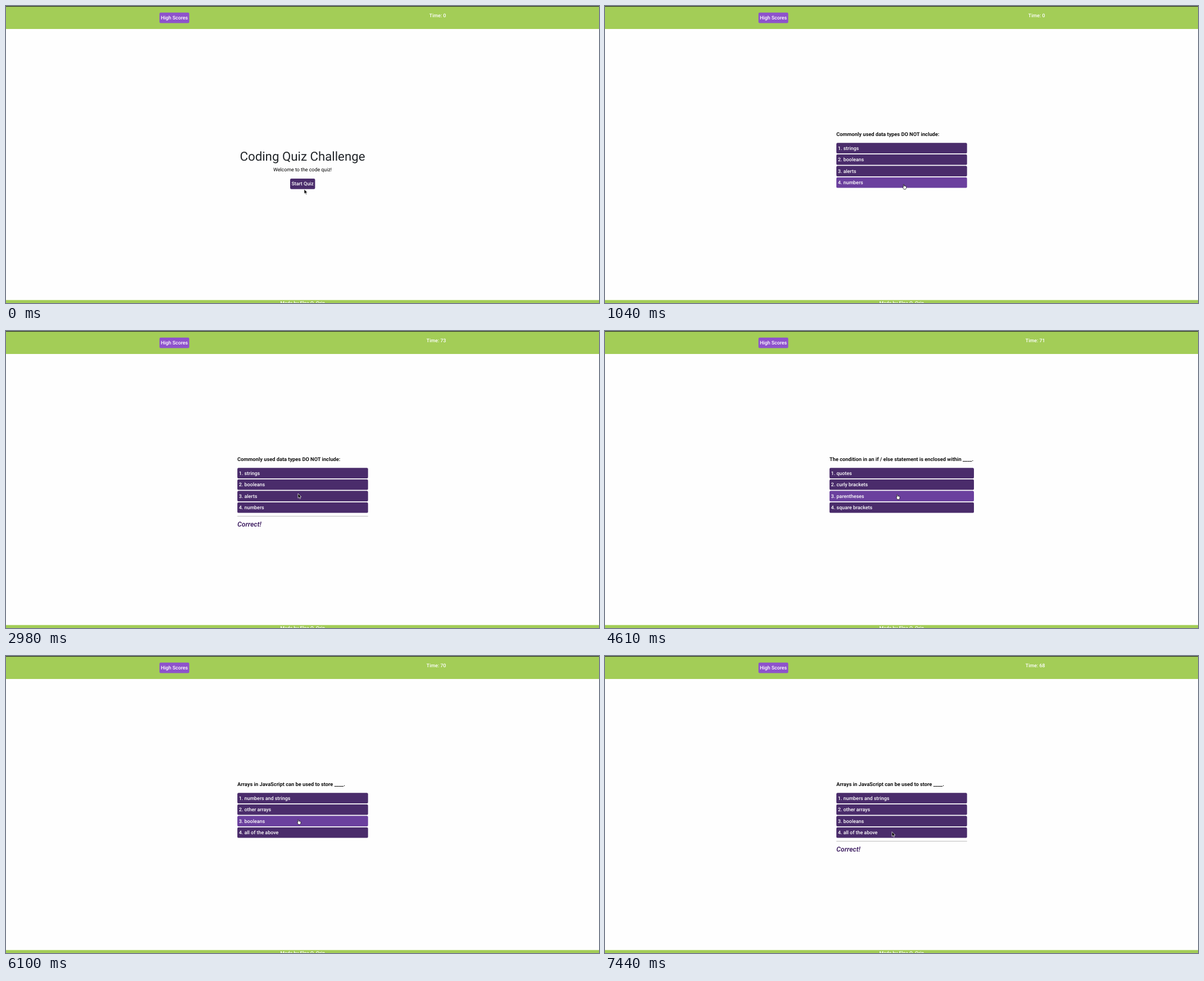
Write an HTML page that moves like this. It is 1056 by 530 pixels and loops after 8 s.

```html
<!DOCTYPE html>
<html lang="en">
<head>
<meta charset="utf-8">
<title>Coding Quiz Challenge</title>
<style>
  html, body { margin: 0; width: 100%; height: 100%; overflow: hidden; background: #fefefe; }
  svg { display: block; width: 100%; height: 100%; }
  text { font: 500 8.9px Roboto, sans-serif; text-rendering: geometricPrecision; white-space: pre; }
  .green { fill: #a3cd57; }
  .light { fill: #fff; }
  .mid { text-anchor: middle; }
  .end { text-anchor: end; }
  .title { font-size: 22.25px; font-weight: 400; fill: #212529; }
  .plain { font-weight: 400; fill: #000; }
  .question { font-size: 9.27px; font-weight: 700; fill: #111; }
  .verdict { font-size: 12.2px; font-weight: 700; font-style: italic; fill: #4a2c6b; }
  .footer { font-size: 8.6px; }
  .button { --lit: 0%; fill: color-mix(in srgb, #6b409e var(--lit), #4a2c6b); }
</style>
</head>
<body>
<svg viewBox="0 0 1056 530">
  <rect width="1056" height="41" class="green"/>
  <rect width="1056" height="1.2" fill="#2e2e2e"/>
  <rect x="273.3" y="11.7" width="53" height="18.8" rx="2.2" fill="#8e52cc"/>
  <text x="299.8" y="24.3" class="light mid">High Scores</text>
  <text id="time" x="783.6" y="19.9" class="light end"></text>

  <g id="intro">
    <text x="528" y="276" class="title mid">Coding Quiz Challenge</text>
    <text x="528" y="295.3" class="plain mid">Welcome to the code quiz!</text>
    <rect id="start" class="button" x="506" y="308" width="44.4" height="18.8" rx="2.2"/>
    <text x="528.1" y="320.3" class="light mid">Start Quiz</text>
  </g>

  <g id="quiz">
    <text id="question" y="231.6" class="question"></text>
    <g id="rows"></g>
    <g id="note">
      <rect id="rule" y="330" height="1" fill="#bdbdbd"/>
      <text id="verdict" y="349.1" class="verdict">Correct!</text>
    </g>
  </g>

  <rect y="524.7" width="1056" height="6" class="green"/>
  <text x="528.3" y="533" class="light mid footer">Made by Elna O. Orin</text>

  <g id="cursor">
    <path id="arrow" d="M0 0V8.3L1.9 6.6L3.1 9.4L4.5 8.8L3.3 6H5.9Z"
      fill="#000" stroke="#fff" stroke-width=".7"/>
    <path id="hand" transform="translate(-2 1)" fill="#fff" stroke="#000" stroke-width=".7" stroke-linejoin="round"
      d="M1.7 5.8V1.2Q2.4 .3 3.1 1.2V3.8Q4 3.3 4.6 4Q5.4 3.5 6 4.3Q7 4 7 5V7Q6.6 8.6 5.8 9.7H2.8Q1.8 8 .6 6.4Q.3 5.3 1.7 6Z"/>
  </g>
</svg>
<script>
const LOOP = 8000, ROW_TOP = 244.3, ROW_STEP = 20.5;
const $ = id => document.getElementById(id);

const pages = [
  { x: 412, width: 232.7, question: 'Commonly used data types DO NOT include:',
    answers: ['strings', 'booleans', 'alerts', 'numbers'] },
  { x: 399.8, width: 257.2, question: 'The condition in an if / else statement is enclosed within ____.',
    answers: ['quotes', 'curly brackets', 'parentheses', 'square brackets'] },
  { x: 412, width: 232.7, question: 'Arrays in JavaScript can be used to store ____.',
    answers: ['numbers and strings', 'other arrays', 'booleans', 'all of the above'] },
];

// The pointer advances in the same coarse ticks as the screen recording.
function glide(start, end, count, [x0, y0], [x1, y1]) {
  return Array.from({ length: count }, (_, i) => {
    const p = (i + 1) / count, e = p * p * (3 - 2 * p);
    return [start + (end - start) * i / (count - 1), { x: x0 + (x1 - x0) * e, y: y0 + (y1 - y0) * e }];
  });
}

const answered = { note: true, hand: false, lit: 0 };
const cues = [
  [0, { page: -1, time: 0, x: 531, y: 327, hand: false, lit: 0, note: false }],
  [150, { x: 532.2, y: 319, hand: true, lit: 1 }],
  [300, { page: 0, y: 318, lit: .5 }],
  [450, { lit: 1 }],
  ...glide(900, 1780, 7, [532.2, 318], [520, 290]),
  [1490, { time: 74 }],
  [2530, { time: 73 }],
  [2980, answered],
  [3420, { time: 72 }],
  [3870, { page: 1, note: false, lit: .5 }],
  [4020, { lit: 1 }],
  [4460, { time: 71 }],
  [4610, { hand: true }],
  [5060, answered],
  [5510, { time: 70 }],
  [5960, { page: 2, note: false, lit: .5 }],
  [6100, { lit: 1, hand: true }],
  [6400, { time: 69 }],
  ...glide(6400, 7290, 7, [520, 290], [511, 313.7]),
  [7440, { ...answered, time: 68 }],
];

function add(parent, tag, attrs) {
  const node = document.createElementNS('http://www.w3.org/2000/svg', tag);
  set(node, attrs);
  return parent.appendChild(node);
}
function set(node, attrs) {
  for (const key in attrs) node.setAttribute(key, attrs[key]);
}
function show(id, on) {
  $(id).style.display = on ? '' : 'none';
}
function light(node, amount) {
  node.style.setProperty('--lit', amount * 100 + '%');
}

const rows = [0, 1, 2, 3].map(i => {
  const y = ROW_TOP + i * ROW_STEP;
  return {
    box: add($('rows'), 'rect', { class: 'button', y, height: 18.8, rx: 2.2 }),
    label: add($('rows'), 'text', { class: 'light', y: y + 12.4 }),
  };
});

function layPage({ x, width, question, answers }) {
  $('question').textContent = question;
  set($('question'), { x });
  set($('rule'), { x, width });
  set($('verdict'), { x });
  rows.forEach(({ box, label }, i) => {
    set(box, { x, width });
    set(label, { x: x + 2.8 });
    label.textContent = `${i + 1}. ${answers[i]}`;
  });
}

function render(t) {
  const s = Object.assign({}, ...cues.filter(([at]) => at <= t).map(([, change]) => change));
  const inQuiz = s.page >= 0;
  const hovered = Math.floor((s.y - ROW_TOP) / ROW_STEP);
  $('time').textContent = `Time: ${s.time}`;
  show('intro', !inQuiz);
  show('quiz', inQuiz);
  show('note', s.note);
  show('hand', s.hand);
  show('arrow', !s.hand);
  if (inQuiz) layPage(pages[s.page]);
  light($('start'), s.lit);
  rows.forEach(({ box }, i) => light(box, i === hovered ? s.lit : 0));
  set($('cursor'), { transform: `translate(${s.x} ${s.y})` });
}

const began = performance.now();
function tick() {
  render((performance.now() - began) % LOOP);
  requestAnimationFrame(tick);
}
tick();
</script>
</body>
</html>
```
